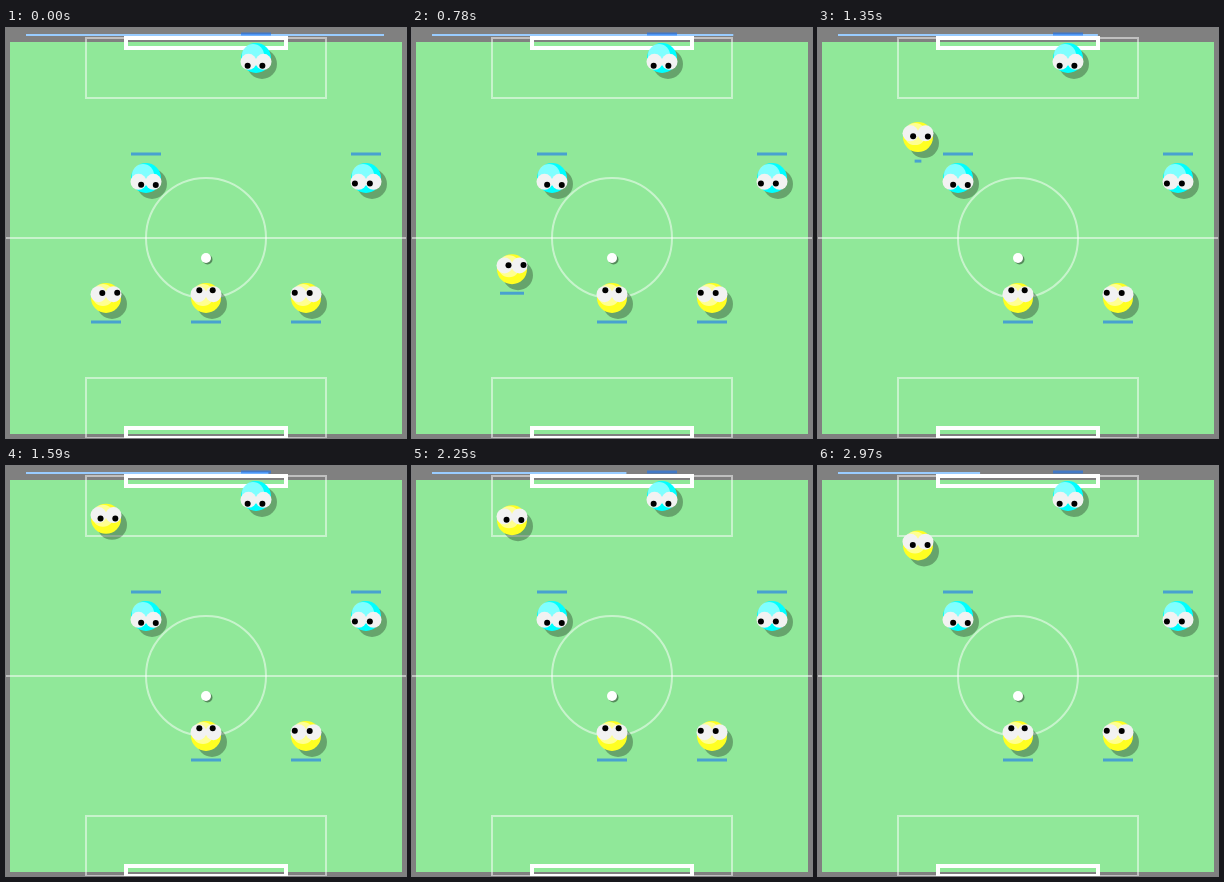
Recreate the animation shown at these times as an HTML page. Size 400x410 px, loop 3 s.

```html
<!DOCTYPE html>
<html>
<head>
<meta charset="utf-8">
<title>Table football</title>
<style>
html, body { margin: 0; width: 100%; height: 100%; overflow: hidden; background: #808080; }
svg { display: block; }
</style>
</head>
<body>
<svg id="stage" width="400" height="410" viewBox="0 0 400 410">
  <rect width="400" height="410" fill="#808080"/>
  <rect x="4" y="14" width="392" height="392" fill="#90e899"/>
  <g fill="none" stroke="#fff" stroke-opacity=".5" stroke-width="2">
    <path d="M0 210H400"/>
    <circle cx="200" cy="210" r="60"/>
    <rect x="80" y="10" width="240" height="60"/>
    <rect x="80" y="350" width="240" height="60"/>
  </g>
  <rect id="timer" x="20" y="6" height="2" fill="#99ccff"/>
  <g fill="none" stroke="#fff" stroke-width="4">
    <rect x="120" y="10" width="160" height="10"/>
    <rect x="120" y="400" width="160" height="10"/>
  </g>
  <g id="shadows" fill="#000" fill-opacity=".29"></g>
  <g id="players"></g>
  <circle cx="201.5" cy="231.5" r="5" fill="#000" fill-opacity=".4"/>
  <circle cx="200" cy="230" r="5" fill="#fff"/>
</svg>
<script>
const LOOP = 3000, STEP = 30;
const BALL = { x: 200, y: 230 };
const THRUST_START = 582, THRUST_END = 1572, BOUNCE = 1820;
const WALL_Y = 18;

const byId = id => document.getElementById(id);

function add(parent, tag, attrs) {
  const el = document.createElementNS("http://www.w3.org/2000/svg", tag);
  set(el, attrs);
  parent.appendChild(el);
  return el;
}

function set(el, attrs) {
  for (const key in attrs) el.setAttribute(key, attrs[key]);
}

// facing is -1 for players attacking upwards, 1 for downwards
function makePlayer(x, y, color, facing) {
  const shadow = add(byId("shadows"), "circle", { cx: x + 6, r: 15 });
  const body = add(byId("players"), "g", {});
  add(body, "circle", { r: 15, fill: color });
  add(body, "circle", { cx: -3, cy: -3, r: 11, fill: "#fff", "fill-opacity": .5 });
  const eyes = [-7.5, 7.5].map(ex => ({ x: ex, y: 3.8 * facing }));
  for (const eye of eyes) add(body, "circle", { cx: eye.x, cy: eye.y, r: 8, fill: "#f2f2f2" });
  for (const eye of eyes) eye.pupil = add(body, "circle", { r: 3, fill: "#000" });
  const bar = add(body, "rect", { y: (facing < 0 ? 24 : -24) - 1.5, height: 3, fill: "#1974f3", "fill-opacity": .6 });
  const player = { x, shadow, body, eyes, bar };
  place(player, y, 1);
  return player;
}

function place({ x, shadow, body, eyes, bar }, y, energy) {
  set(shadow, { cy: y + 6 });
  set(body, { transform: `translate(${x} ${y})` });
  for (const eye of eyes) {
    const angle = Math.atan2(BALL.y - y - eye.y, BALL.x - x - eye.x);
    set(eye.pupil, { cx: eye.x + 4 * Math.cos(angle), cy: eye.y + 4 * Math.sin(angle) });
  }
  set(bar, { x: -15 * energy, width: 30 * energy });
}

// distance factor travelled after s seconds under drag k
const glide = (s, k) => (1 - Math.exp(-k * s)) / k;

function runnerY(t) {
  const speed = 235;
  if (t >= BOUNCE) return WALL_Y + 116 * glide((t - BOUNCE) / 1000, 1.58);
  const push = Math.max(0, Math.min(t, THRUST_END) - THRUST_START) / 1000;
  const coast = Math.max(0, t - THRUST_END) / 1000;
  const y = 270 - speed * (push - glide(push, 12)) - speed * glide(coast, 3.5);
  return Math.max(WALL_Y, y);
}

const CYAN = "#00ffff", YELLOW = "#ffff22";
makePlayer(250, 30, CYAN, 1);
makePlayer(140, 150, CYAN, 1);
makePlayer(360, 150, CYAN, 1);
makePlayer(200, 270, YELLOW, -1);
makePlayer(300, 270, YELLOW, -1);
const runner = makePlayer(100, 270, YELLOW, -1);

function draw(t) {
  const used = (t - THRUST_START) / (THRUST_END - THRUST_START);
  place(runner, runnerY(t), 1 - Math.max(0, Math.min(1, used)));
  set(byId("timer"), { width: 358 - 0.0727 * t });
}

const start = performance.now();
function frame() {
  const t = (performance.now() - start) % LOOP;
  draw(Math.floor(t / STEP) * STEP);
  requestAnimationFrame(frame);
}
frame();
</script>
</body>
</html>
```
